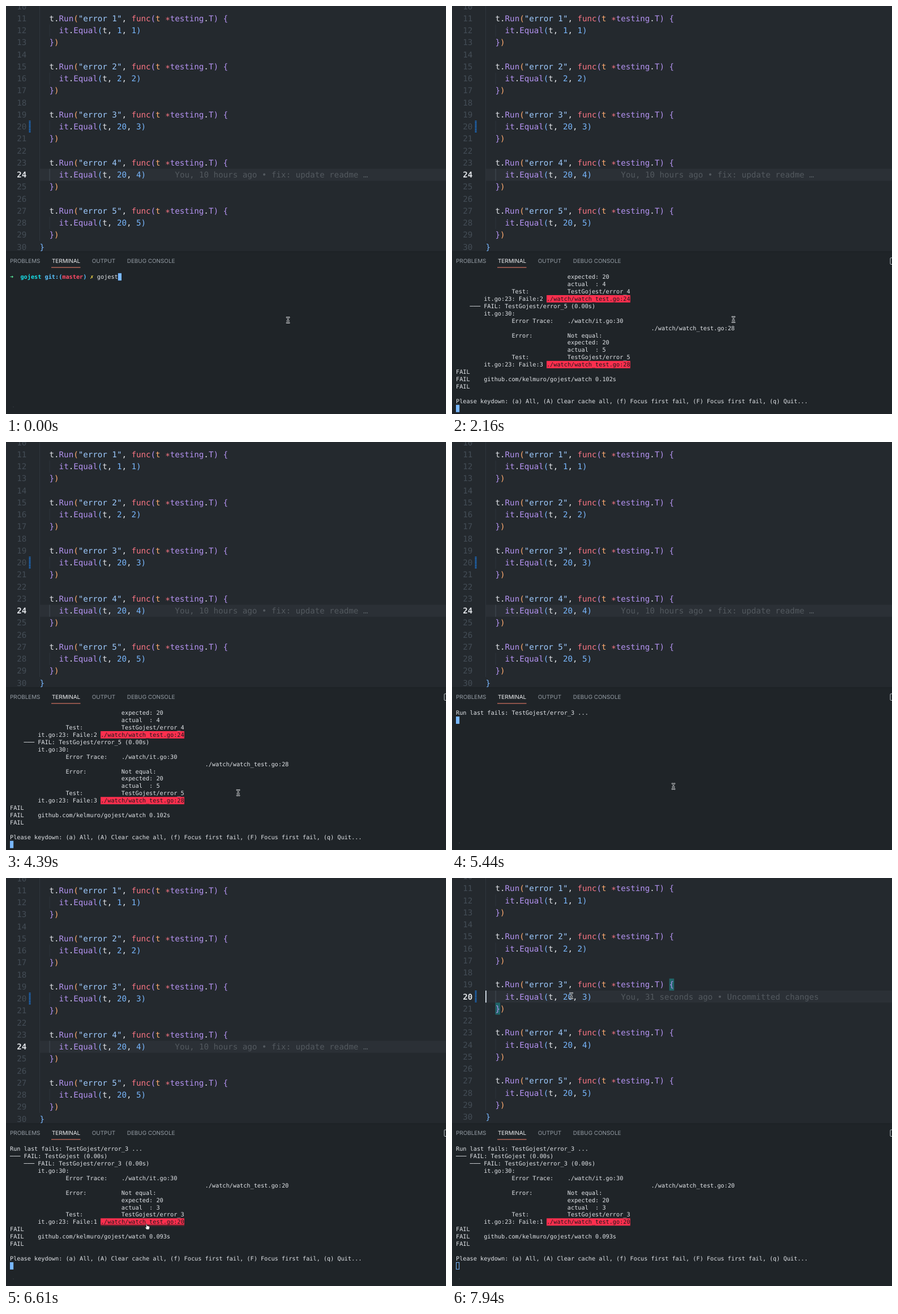
Animation of 777x721 px, one loop 8 s. Source, as an HTML page:

```html
<!DOCTYPE html>
<html lang="en">
<head>
<meta charset="utf-8">
<title>Test watcher</title>
<style>
  html, body { margin: 0; width: 100%; height: 100%; overflow: hidden; background: #1f2428; }
  svg { display: block; width: 777px; height: 721px; }
  text { white-space: pre; text-rendering: geometricPrecision; }
  .code { font: 14.17px "DejaVu Sans Mono", monospace; }
  .term { font: 10.225px "DejaVu Sans Mono", monospace; }
  .tab { font: 9.9px Inter, sans-serif; }
  .bold { font-weight: 700; }
</style>
</head>
<body>
<svg id="stage" viewBox="0 0 777 721"></svg>
<script>
const LOOP = 8000;
const CODE = { x: 59.5, top: 11.4, cw: 8.531, lh: 21.25, first: 11 };
const TERM = { x: 7, top: 472.2, cw: 6.156, lh: 12.92 };
const INK = {
  w: '#e1e4e8', p: '#b392f0', o: '#ffab70', s: '#9ecbff', k: '#f97583', n: '#79b8ff',
  dim: '#444d56', note: '#53595f', alert: '#ff2f4e', cursor: '#79b8ff', dark: '#15181b'
};

const stage = document.getElementById('stage');

function add(parent, tag, attrs = {}, content) {
  const node = document.createElementNS('http://www.w3.org/2000/svg', tag);
  for (const key in attrs) node.setAttribute(key, attrs[key]);
  if (content !== undefined) node.textContent = content;
  parent.appendChild(node);
  return node;
}
const rect = (parent, x, y, width, height, fill) => add(parent, 'rect', { x, y, width, height, fill });
const show = (node, on) => node.setAttribute('visibility', on ? 'visible' : 'hidden');

// Spans are [colour, text, extra class] triples on one baseline.
function spans(parent, cls, x, y, list) {
  const line = add(parent, 'text', { class: cls, x, y });
  for (const [fill, str, extra = ''] of list) add(line, 'tspan', { fill, class: extra }, str);
}

// ---------- editor ----------
const clip = add(add(stage, 'defs'), 'clipPath', { id: 'editorClip' });
rect(clip, 0, 0, 777, 434);
rect(stage, 0, 0, 777, 434, '#24292e');
const editor = add(add(stage, 'g', { 'clip-path': 'url(#editorClip)' }), 'g');

const rowTop = n => CODE.top + (n - CODE.first) * CODE.lh;
const codeX = col => CODE.x + col * CODE.cw;
const baseline = n => rowTop(n) + CODE.lh / 2 + 4.95;
const paint = str => str.split('|').map(part => [INK[part[0]], part.slice(2)]);

const activeRow = rect(editor, 59, 0, 718, CODE.lh, '#2b3036');
const brackets = add(editor, 'g');
rect(brackets, codeX(38), rowTop(19), CODE.cw, CODE.lh, '#206468');
rect(brackets, codeX(2), rowTop(21), CODE.cw, CODE.lh, '#206468');

rect(editor, 59, -5, 1, rowTop(30) + 5, '#2f363d');
const guides = {};
const numbers = {};
for (let n = 10; n <= 30; n++) {
  numbers[n] = add(editor, 'text', { class: 'code', x: 36.3, y: baseline(n), 'text-anchor': 'end' }, n);
}
for (let i = 1; i <= 5; i++) {
  const n = 7 + i * 4;
  const value = i < 3 ? i : 20;
  guides[n + 1] = rect(editor, codeX(2), rowTop(n + 1), 1, CODE.lh, '#2f363d');
  const lines = [
    [2, `w:t.|p:Run|o:(|s:"error ${i}"|w:, |k:func|p:(|o:t |k:∗|p:testing|w:.|p:T) {`],
    [4, `p:it|w:.|p:Equal|n:(|w:t, |n:${value}|w:, |n:${i})`],
    [2, 'p:}|o:)']
  ];
  lines.forEach(([col, str], k) => spans(editor, 'code', codeX(col), baseline(n + k), paint(str)));
}
spans(editor, 'code', codeX(0), baseline(30), paint('n:}'));

add(editor, 'path', {
  d: `M42 ${rowTop(20)}v${CODE.lh}`, stroke: '#1b7be0', 'stroke-width': 3, 'stroke-dasharray': '1.4 1'
});
const note = (n, str) => add(editor, 'text', { class: 'code', x: codeX(28), y: baseline(n), fill: INK.note }, str);
const oldNote = note(24, 'You, 10 hours ago • fix: update readme …');
const newNote = note(20, 'You, 31 seconds ago • Uncommitted changes');
const caret = rect(editor, 59, rowTop(20), 1.7, CODE.lh, '#e6f0fb');

// ---------- panel ----------
rect(stage, 0, 433.5, 777, 1, '#1b1f23');
[[7, 'PROBLEMS'], [81, 'TERMINAL'], [151.8, 'OUTPUT'], [213.8, 'DEBUG CONSOLE']].forEach(([x, label]) =>
  add(stage, 'text', { class: 'tab', x, y: 454, fill: label === 'TERMINAL' ? '#f0f2f4' : '#959da5' }, label));
rect(stage, 80, 461.5, 51.5, 1, '#f9826c');
const icon = add(stage, 'rect', {
  x: 774, y: 445, width: 12, height: 11.5, rx: 1, fill: 'none', stroke: '#c4c9ce'
});
add(stage, 'circle', { cx: 13, cy: 708.5, r: 0.7, fill: '#3c4349' });

const termX = col => TERM.x + col * TERM.cw;
const termTop = row => TERM.top + row * TERM.lh;
const termBase = row => termTop(row) + TERM.lh / 2 + 3.5;

const pad = (col, label, value) => ' '.repeat(col) + label.padEnd(16) + value;
const failure = n => [
  `    ─── FAIL: TestGojest/error_${n} (0.00s)`,
  '        it.go:30:',
  pad(16, 'Error Trace:', './watch/it.go:30'),
  pad(40, '', `./watch/watch_test.go:${n * 4 + 8}`),
  pad(16, 'Error:', 'Not equal:'),
  pad(16, '', 'expected: 20'),
  pad(16, '', `actual  : ${n}`),
  pad(16, 'Test:', `TestGojest/error_${n}`),
  `        it.go:23: Faile:${n - 2} ./watch/watch_test.go:${n * 4 + 8}`
];
const summary = time => [
  'FAIL', `FAIL    github.com/kelmuro/gojest/watch ${time}s`, 'FAIL', '',
  'Please keydown: (a) All, (A) Clear cache all, (f) Focus first fail, (F) Focus first fail, (q) Quit...'
];
const rerun = 'Run last fails: TestGojest/error_3 ...';

function makeScreen(at, rows, cursor) {
  const group = add(stage, 'g');
  const links = [];
  rows.forEach((row, r) => {
    const match = /\.\/watch\/\S+/.exec(row);
    if (!match) return spans(group, 'term', TERM.x, termBase(r), [[INK.w, row]]);
    const alert = row.includes('Faile');
    const x = termX(match.index), width = match[0].length * TERM.cw, y = termTop(r);
    const ink = alert ? INK.dark : INK.w;
    if (alert) rect(group, x, y, width, TERM.lh, INK.alert);
    spans(group, 'term', TERM.x, termBase(r), [[INK.w, row.slice(0, match.index)], [ink, match[0]]]);
    links.push({ x, y, width, line: rect(group, x, y + 11.3, width, 1, ink) });
  });
  return { at, group, links, cursor };
}

const prompt = makeScreen(0, [], [31, 0]);
spans(prompt.group, 'term', TERM.x, termBase(0), [
  ['#5cf19e', '➜  ', 'bold'], ['#18dfe8', 'gojest ', 'bold'], ['#59c2ff', 'git:(', 'bold'],
  ['#ff4a66', 'master', 'bold'], ['#59c2ff', ') ', 'bold'], ['#ffe14d', '✗ ', 'bold'], [INK.w, 'gojest']
]);
const screens = [
  prompt,
  { ...prompt, at: 720, cursor: [0, 1] },
  makeScreen(1170, [...failure(4).slice(5), ...failure(5), ...summary('0.102')], [0, 18]),
  makeScreen(5440, [rerun], [0, 1]),
  makeScreen(5710, [rerun, '─── FAIL: TestGojest (0.00s)', ...failure(3), ...summary('0.093')], [0, 16])
];
const block = add(stage, 'rect', { width: TERM.cw, height: TERM.lh });

// ---------- pointer ----------
const pointer = add(stage, 'g');
const beam = add(pointer, 'g', { fill: 'none', 'stroke-linecap': 'round' });
const beamPath = 'M-2.2 -4.7Q0 -4.7 0 -3.2Q0 -4.7 2.2 -4.7M0 -3.2V3.4M-2.2 4.9Q0 4.9 0 3.4Q0 4.9 2.2 4.9M-1.3 1.4H1.3';
add(beam, 'path', { d: beamPath, stroke: '#d9dcdf', 'stroke-width': 2.4 });
add(beam, 'path', { d: beamPath, stroke: '#15181b', 'stroke-width': 0.9 });
const hand = add(pointer, 'path', {
  d: 'M-1.4 .6Q-.6 -.4 .2 .6L.8 4Q2 3.2 2.8 4.2Q4 3.8 4.4 4.8Q5.4 4.8 5.2 6.4L4.3 10.2H-.3L-3 6.6Q-2.6 5.4 -1 6.6Z',
  fill: '#fff', stroke: '#15181b', 'stroke-width': 0.8, 'stroke-linejoin': 'round'
});

// Each move runs along a quadratic curve in held steps.
const moves = [
  { at: 0, end: 1, steps: 2, path: [[498, 555], [498, 555], [498, 555]] },
  { at: 2160, end: 2880, steps: 9, path: [[497, 554], [440, 584], [363, 520]] },
  { at: 2970, end: 3760, steps: 10, path: [[362, 523], [400, 468], [409.5, 619]] },
  { at: 4390, end: 4470, steps: 2, path: [[410, 619.7], [409.7, 620], [409, 619.5]] },
  { at: 4920, end: 5090, steps: 3, path: [[405, 617], [398, 611], [391, 608.3]] },
  { at: 6160, end: 6610, steps: 6, path: [[385, 606], [310, 596], [248.5, 611]] },
  { at: 7150, end: 7940, steps: 10, path: [[249, 606], [240, 400], [210.7, 208]] }
];
const latest = (list, t) => list.filter(item => item.at <= t).pop();

function pointerAt(t) {
  const { at, end, steps, path: [a, b, c] } = latest(moves, t);
  const gap = (end - at) / (steps - 1);
  const k = Math.min(steps - 1, Math.floor((t - at) / gap + 0.001)) / (steps - 1);
  const u = k * k * (3 - 2 * k), v = 1 - u;
  return [0, 1].map(i => v * v * a[i] + 2 * u * v * b[i] + u * u * c[i]);
}

function render(t) {
  const clicked = t >= 6970;
  const active = clicked ? 20 : 24;
  editor.setAttribute('transform', `translate(0 ${clicked ? -3.7 : 0})`);
  activeRow.setAttribute('y', rowTop(active));
  for (const n in numbers) {
    numbers[n].setAttribute('fill', n == active ? INK.w : INK.dim);
    numbers[n].classList.toggle('bold', n == active);
  }
  for (const n in guides) guides[n].setAttribute('fill', n == active ? '#444d56' : '#2f363d');
  show(brackets, clicked);
  show(oldNote, !clicked);
  show(newNote, t >= 7240);
  show(caret, clicked && !(t >= 7430 && t < 7900));
  show(icon, t >= 810);

  const screen = latest(screens, t);
  for (const s of screens) s.group.style.display = s.group === screen.group ? '' : 'none';
  const [col, row] = screen.cursor;
  const inset = clicked ? 0.5 : 0;
  block.setAttribute('x', termX(col) + inset);
  block.setAttribute('y', termTop(row) + inset);
  block.setAttribute('width', TERM.cw - 2 * inset);
  block.setAttribute('height', TERM.lh - 2 * inset);
  block.setAttribute('fill', clicked ? 'none' : INK.cursor);
  block.setAttribute('stroke', clicked ? INK.cursor : 'none');

  const [x, y] = pointerAt(t);
  let hovering = false;
  for (const link of screen.links) {
    const over = x >= link.x && x < link.x + link.width && y >= link.y && y < link.y + TERM.lh;
    show(link.line, over);
    hovering = hovering || over;
  }
  pointer.setAttribute('transform', `translate(${x} ${y})`);
  show(beam, !hovering);
  show(hand, hovering);
}

const start = performance.now();
function tick() {
  render((performance.now() - start) % LOOP);
  requestAnimationFrame(tick);
}
tick();
</script>
</body>
</html>
```
